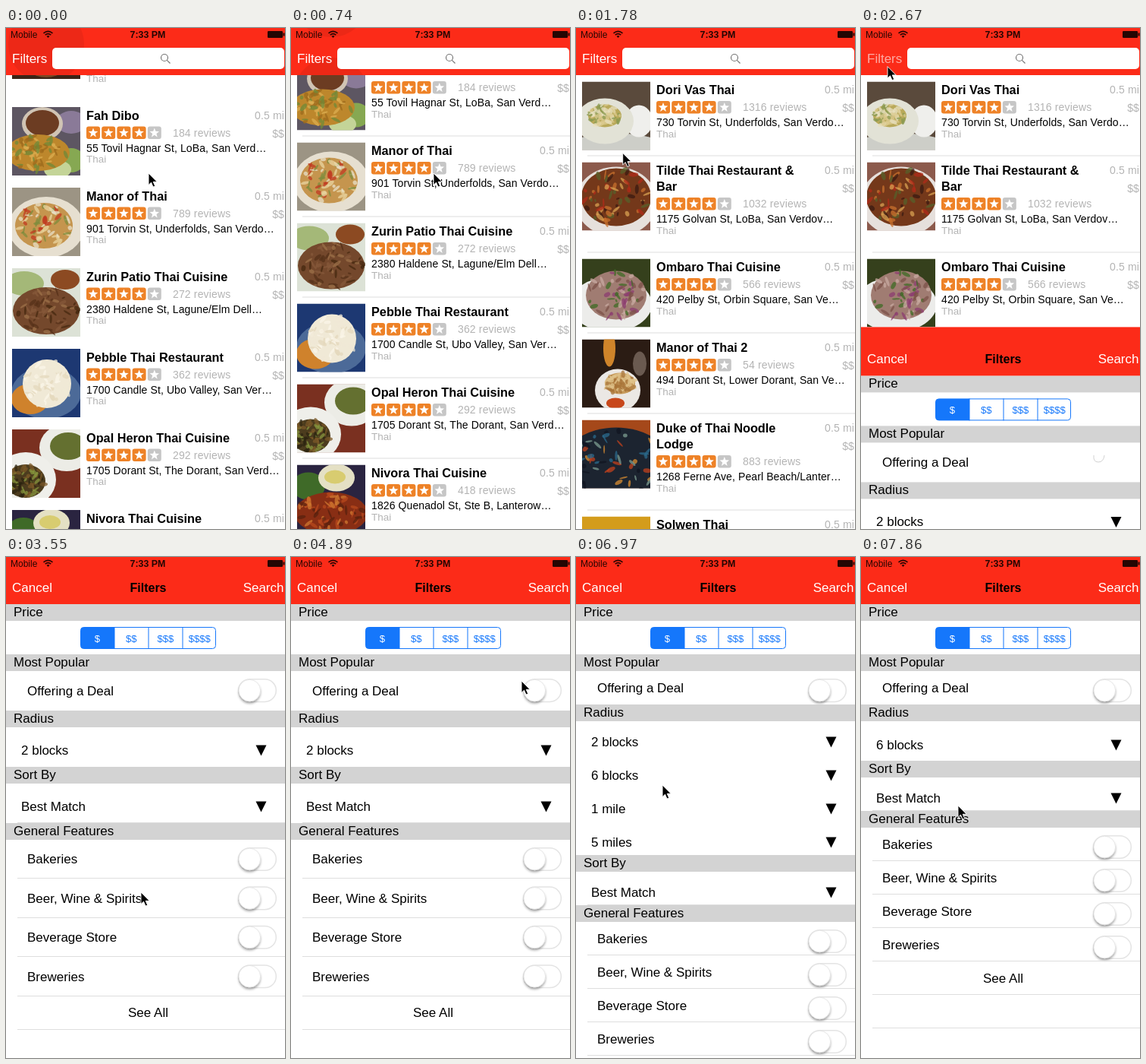
Animation, 368 px wide and 659 px high, one loop 8000 ms. Source, as an HTML page:

```html
<!DOCTYPE html>
<html lang="en">
<head>
<meta charset="utf-8">
<title>Restaurant search</title>
<style>
  html, body { margin: 0; width: 100%; height: 100%; overflow: hidden; background: #fff; }
  svg { display: block; width: 368px; height: 659px; }
  text { font: 17px "Liberation Sans", Arial, sans-serif; white-space: pre; }
  .name { font-size: 16.3px; font-weight: bold; }
  .title { font-size: 16px; font-weight: bold; }
  .light { font-size: 14px; letter-spacing: .15px; fill: #b4b4b4; }
  .addr { font-size: 14px; letter-spacing: .1px; }
  .kind { font-size: 13.5px; fill: #b4b4b4; }
  .seg { font-size: 13px; }
  .small { font-size: 12px; }
  .clock { font-size: 12.4px; font-weight: bold; }
</style>
</head>
<body>
<svg viewBox="0 0 368 659" xmlns="http://www.w3.org/2000/svg">
  <defs>
    <clipPath id="photo"><rect width="90" height="90"/></clipPath>
    <clipPath id="top"><rect width="368" height="62"/></clipPath>
    <filter id="soft" x="-30%" y="-30%" width="160%" height="180%">
      <feDropShadow dx="0" dy="2.5" stdDeviation="1.5" flood-opacity=".35"/>
    </filter>
    <g id="switch">
      <rect x="306.7" y="-14.8" width="49.6" height="29.6" rx="14.8" fill="#fff" stroke="#e4e4e4" stroke-width="1.5"/>
      <circle cx="321.3" r="14.3" fill="#fff" stroke="#d8d8d8" stroke-width=".6" filter="url(#soft)"/>
    </g>
    <path id="arrow" d="M329.5-6.5h14l-7 14z"/>
  </defs>
  <g id="list"></g>
  <g id="bar">
    <rect width="368" height="62" fill="#fc2b18"/>
    <g clip-path="url(#top)"><g id="shade" opacity=".06"></g></g>
    <text id="filters" x="8" y="46" fill="#fff">Filters</text>
    <rect x="61" y="26" width="306" height="28" rx="5" fill="#fff"/>
    <g fill="none" stroke="#777" stroke-width="1.2"><circle cx="209" cy="39" r="4.5"/><path d="M212.3 42.3l4.2 4.2"/></g>
  </g>
  <g id="panel"></g>
  <g id="status" fill="#250603">
    <text class="small" x="6" y="13">Mobile</text>
    <path d="M49.5 6.8q6-5 12 0M51.7 9.2q3.8-3.2 7.6 0" fill="none" stroke="#250603" stroke-width="1.6"/>
    <path d="M53.5 10.8q2-1.6 4 0l-2 2.2z"/>
    <text class="clock" x="187" y="13" text-anchor="middle">7:33 PM</text>
    <rect x="345" y="4" width="20" height="9" rx="1.2"/><rect x="365.5" y="6.5" width="2" height="4"/>
  </g>
  <path id="cursor" d="M0 0v15.5l3.5-3.3 2.5 5.8 2.7-1.1-2.5-5.6h5z" fill="#000" stroke="#fff" stroke-width=".9"/>
</svg>
<script>
const LOOP = 8000, TICK = LOOP / 54;
const $ = id => document.getElementById(id);
const clamp = u => Math.max(0, Math.min(1, u));
const smooth = u => (u = clamp(u), u * u * (3 - 2 * u));
const text = (x, y, s, cls = "", more = "") => `<text x="${x}" y="${y}" class="${cls}" ${more}>${s}</text>`;
const rect = (x, y, w, h, fill, more = "") => `<rect x="${x}" y="${y}" width="${w}" height="${h}" fill="${fill}" ${more}/>`;
const use = (id, y) => `<use href="#${id}" y="${y}"/>`;
const line = y => rect(15, y, 353, 1, "#dedede");

// Each place: name lines, reviews, address, photo ground, ellipses, garnish colours.
const places = [
  [["Dori Vas Thai"], 1316, "730 Torvin St, Underfolds, San Verdo…", "#5a4a3c",
    [[45, 84, 60, 16, "#cdcec8"], [75, 52, 18, 21, "#efefec"], [30, 52, 38, 30, "#e2e2d6"], [30, 45, 22, 15, "#b9a95a"]], ["#8a9a50", "#dccb90", "#e8e0c0"]],
  [["Tilde Thai Restaurant &amp;", "Bar"], 1032, "1175 Golvan St, LoBa, San Verdov…", "#8c5a4c",
    [[45, 52, 54, 46, "#e6e0dc"], [45, 46, 46, 38, "#74381a"]], ["#3a1a10", "#c8702c", "#b02a18", "#d8a050", "#56602a"]],
  [["Ombaro Thai Cuisine"], 566, "420 Pelby St, Orbin Square, San Ve…", "#35401c",
    [[38, 60, 54, 36, "#ececea"], [45, 48, 40, 32, "#a07c72"]], ["#c8aaa0", "#3f6b24", "#7c5248", "#8c3c70"]],
  [["Manor of Thai 2"], 54, "494 Dorant St, Lower Dorant, San Ve…", "#2b1c14",
    [[36, 12, 8, 24, "#cf842a"], [76, 32, 9, 16, "#6a5a50"], [47, 67, 30, 28, "#ebe8e4"], [44, 84, 12, 7, "#c8481c"], [50, 58, 20, 14, "#c79b5c"]], ["#e0c48c", "#a87438"]],
  [["Duke of Thai Noodle", "Lodge"], 883, "1268 Ferne Ave, Pearl Beach/Lanter…", "#a5481a",
    [[45, 56, 70, 46, "#1c2430"]], ["#c0401c", "#d88c30", "#2a6a8c", "#101420", "#7c9c90"]],
  [["Solwen Thai"], 612, "2114 Candle Rd, Ubo Valley, San Ver…", "#d49c1c",
    [[45, 66, 46, 30, "#e8e0d0"], [45, 62, 32, 20, "#9c5a24"]], ["#5c3014", "#d8a040"]],
  [["Amber Wick Thai", "Kitchen"], 305, "77 Hollin St, LoBa, San Verdova…", "#3c2416",
    [[45, 50, 42, 34, "#ddd6cc"], [45, 58, 34, 30, "#7c4824"]], ["#4a2814", "#b47838"]],
  [["Fah Dibo"], 184, "55 Tovil Hagnar St, LoBa, San Verd…", "#5d5662",
    [[78, 20, 20, 15, "#8a7a98"], [40, 22, 27, 22, "#d0c4b4"], [40, 21, 22, 17, "#6c3c22"], [78, 70, 18, 16, "#86a852"], [60, 82, 18, 12, "#c4d498"], [34, 60, 42, 24, "#bd872c"]], ["#dcae50", "#9c6a1c", "#6f8a38"]],
  [["Manor of Thai"], 789, "901 Torvin St, Underfolds, San Verdo…", "#9c9484",
    [[45, 52, 50, 40, "#e6dfd0"], [42, 50, 38, 30, "#c5954e"]], ["#ead6a0", "#c03a20", "#7c8c3c", "#e8e0c8"]],
  [["Zurin Patio Thai Cuisine"], 272, "2380 Haldene St, Lagune/Elm Dell…", "#dce2d6",
    [[16, 20, 26, 16, "#a4b878"], [70, 15, 19, 13, "#8c4a22"], [45, 56, 44, 31, "#74482c"]], ["#553018", "#9c7048", "#86583a", "#46280f"]],
  [["Pebble Thai Restaurant"], 362, "1700 Candle St, Ubo Valley, San Ver…", "#1d3872",
    [[45, 58, 46, 34, "#4c6a98"], [24, 66, 25, 20, "#cf822c"], [46, 46, 32, 32, "#f0e9d6"]], ["#fbf6e8", "#e4d8bc", "#f0e9d6"]],
  [["Opal Heron Thai Cuisine"], 292, "1705 Dorant St, The Dorant, San Verd…", "#7a3020",
    [[72, 24, 36, 31, "#ececE6"], [74, 22, 24, 18, "#647030"], [18, 66, 40, 36, "#efefea"], [18, 68, 26, 22, "#4c3c1e"]], ["#7c5a28", "#2c2410", "#86943c"]],
  [["Nivora Thai Cuisine"], 418, "1826 Quenadol St, Ste B, Lanterow…", "#2a2440",
    [[15, 28, 22, 18, "#3f6a28"], [52, 17, 24, 18, "#e4e0c4"], [50, 16, 14, 9, "#d8cc70"], [45, 64, 48, 28, "#882e14"]], ["#b8481c", "#58200e", "#d07830"]]
];

function random(seed) {
  return () => (seed = (seed * 16807) % 2147483647) / 2147483647;
}

function photo(ground, shapes, garnish, seed) {
  const next = random(seed * 7919 + 13);
  const [cx, cy, rx, ry] = shapes[shapes.length - 1];
  let out = rect(0, 0, 90, 90, ground);
  for (const [x, y, a, b, c] of shapes) out += `<ellipse cx="${x}" cy="${y}" rx="${a}" ry="${b}" fill="${c}"/>`;
  for (let i = 0; i < 60; i++) {
    const a = next() * 6.283, r = Math.sqrt(next()) * .95;
    const x = cx + rx * r * Math.cos(a), y = cy + ry * r * Math.sin(a);
    out += `<ellipse rx="${2 + 5 * next()}" ry="${1 + 2 * next()}" fill="${garnish[i % garnish.length]}" opacity=".75" transform="translate(${x} ${y}) rotate(${180 * next()})"/>`;
  }
  return `<g transform="translate(8 8.5)" clip-path="url(#photo)">${out}</g>`;
}

function starPath(cx, cy, r) {
  const pts = [];
  for (let i = 0; i < 10; i++) {
    const a = Math.PI * (i / 5 - .5), k = i % 2 ? r * .42 : r;
    pts.push((cx + k * Math.cos(a)).toFixed(2) + " " + (cy + k * Math.sin(a)).toFixed(2));
  }
  return `<path d="M${pts.join("L")}z" fill="#fff"/>`;
}

function stars(y) {
  let out = "";
  for (let i = 0; i < 5; i++) {
    const x = 106 + 20.2 * i;
    out += rect(x, y - 8, 18, 16.5, i < 4 ? "#ee8227" : "#c6c6c6", 'rx="3"') + starPath(x + 9, y + .6, 6.6);
  }
  return out;
}

function buildList() {
  let top = 62, rows = "", lines = "", shade = "";
  places.forEach(([name, count, addr, ground, shapes, garnish], i) => {
    const d = (name.length - 1) * 21;
    rows += `<g transform="translate(0 ${top})">` + photo(ground, shapes, garnish, i + 1) +
      name.map((s, k) => text(106, 25 + 20.5 * k, s, "name")).join("") +
      text(367, 24, "0.5 mi", "light", 'text-anchor="end"') +
      text(367, 48, "$$", "light", 'text-anchor="end"') +
      stars(42 + d) + text(220, 47 + d, count + " reviews", "light") +
      text(106, 67 + d, addr, "addr") + text(106, 81.5 + d, "Thai", "kind") + "</g>";
    shade += `<circle cx="53" cy="${top + 53}" r="50"/>`;
    top += 106 + d;
    lines += line(top - .5);
  });
  $("list").innerHTML = rows + `<g id="lines">${lines}</g>`;
  $("shade").innerHTML = shade;
}

function segments() {
  let out = rect(98.5, 92.5, 178, 28, "#fff", 'rx="4" stroke="#1577fb"') +
    '<path d="M143 92.5h-40.5q-4 0-4 4v20q0 4 4 4H143z" fill="#1577fb"/>';
  for (let i = 0; i < 4; i++) {
    if (i) out += rect(97.5 + 45 * i, 92, 1, 29, "#1577fb");
    out += text(120.3 + 45 * i, 111.5, "$".repeat(i + 1), "seg", `text-anchor="middle" fill="${i ? "#1577fb" : "#fff"}"`);
  }
  return out;
}

const header = (y, s) => rect(0, y, 368, 22, "#cfcfcf", 'opacity=".9"') + text(10, y + 16, s);
const option = (y, s, o = 1) => `<g opacity="${o}">${text(20, y + 6, s)}${use("arrow", y)}</g>`;
const rowLine = y => line(Math.round(y) - 1);

// p opens the radius choices, q closes them again.
function drawPanel(slide, p, q) {
  const mix = (a, b, c) => a + (b - a) * p + (c - b) * q;
  const opening = p > 0 && p < 1;
  const shift = opening ? 34 * (1 - p) : 0;
  const rowH = mix(51.4, 44, 44), smallH = mix(52, 44, 44);
  const radius = 150 + smallH, choices = radius + 22;
  const sort = choices + mix(52, 176, 52), sortCell = sort + 22 + shift;
  const general = sort + 22 + smallH, rows = general + 22;
  const pitch = 44 * (p - q), first = choices + mix(30, 27, 31);
  const toggle = y => slide > 100
    ? `<path d="M307 ${y - 9}q-1 9 6 9q7 0 8-9" fill="none" stroke="#d2d2d2"/>`
    : use("switch", y);

  let out = rect(0, -2, 368, 663, "#fff") + segments() +
    text(28, 150 + smallH / 2 + 5.5, "Offering a Deal") + toggle(175.6);
  if (opening) out += rect(0, choices, 368, 52, "#d9d9d9", `opacity="${.7 * (1 - p)}"`);
  if (q > 0 && q < 1) out += rect(0, choices + pitch, 368, 48, "#d9d9d9", `opacity="${1 - q}"`);
  ["2 blocks", "6 blocks", "1 mile", "5 miles"].forEach((s, i) => {
    const o = i === 0 ? (opening ? .6 : 1 - q) : i === 1 ? p : p * (1 - q);
    if (o > 0) out += option(first + pitch * i, s, o);
  });
  out += option(sortCell + mix(30, 27, 27), "Best Match") + rowLine(sortCell + smallH);

  ["Bakeries", "Beer, Wine &amp; Spirits", "Beverage Store", "Breweries"].forEach((s, i) => {
    const y = rows + shift + rowH * i;
    out += text(28, y + rowH / 2 + 5.7, s) + toggle(y + 25.5) + rowLine(y + rowH);
  });
  const end = rows + rowH * 4;
  if (!shift) out += text(187.5, end + 27.5, "See All", "", 'text-anchor="middle"');
  out += rowLine(end + 44) + rowLine(end + 44 + rowH);

  out += header(62, "Price") + header(128, "Most Popular") + header(radius, "Radius") +
    header(sort, "Sort By") + header(general, "General Features") +
    rect(0, -2, 368, 64, "#fc2b18") + text(8, 46, "Cancel", "", 'fill="#fff"') +
    text(187.5, 46, "Filters", "title", 'text-anchor="middle"') +
    text(366.5, 46, "Search", "", 'fill="#fff" text-anchor="end"');
  $("panel").innerHTML = out;
  $("panel").setAttribute("transform", `translate(0 ${slide})`);
}

function scrollAt(t) {
  const s = t < 745 ? 831 - 59.5 * (1 - Math.min(1, t / 740)) ** 2
    : 831 * (1 - clamp((t - 740) / 758)) ** 3;
  return Math.round(s * 2) / 2;
}

function slideAt(t) {
  const x = .01826 * Math.max(0, t - 2591);
  const left = (1 + x) * Math.exp(-x);
  return left < .001 ? 0 : 661 * left;
}

// time, x, y
const path = [
  [740, 188, 191], [1330, 90, 282], [2230, 33, 45], [2600, 33, 45], [3550, 178, 441],
  [3700, 178, 441], [4890, 304, 163], [5330, 281, 206], [5640, 298, 253],
  [5930, 298, 253], [6970, 114, 300], [7560, 114, 300], [7850, 128, 327]
];

function cursorAt(t) {
  let a = path[0];
  for (const b of path) {
    if (t < b[0]) {
      const u = a === b ? 0 : smooth((t - a[0]) / (b[0] - a[0]));
      return [a[1] + (b[1] - a[1]) * u, a[2] + (b[2] - a[2]) * u];
    }
    a = b;
  }
  return [a[1], a[2]];
}

function render(t) {
  const scroll = scrollAt(t);
  for (const id of ["list", "shade"]) $(id).setAttribute("transform", `translate(0 ${-scroll})`);
  // Hairlines vanish on half-pixel offsets.
  $("lines").setAttribute("visibility", scroll % 1 ? "hidden" : "visible");
  $("filters").setAttribute("opacity", t > 2500 ? .6 : 1);
  drawPanel(slideAt(t), smooth((t - 5844) / 300), smooth((t - 7029) / 300));
  const [x, y] = cursorAt(t);
  $("cursor").setAttribute("transform", `translate(${x.toFixed(1)} ${y.toFixed(1)})`);
}

buildList();
const start = performance.now();
let last = -1;
function loop() {
  const t = (performance.now() - start) % LOOP;
  const step = Math.floor((t + 5) / TICK) % 54;
  if (step !== last) render((last = step) * TICK);
  requestAnimationFrame(loop);
}
loop();
</script>
</body>
</html>
```
